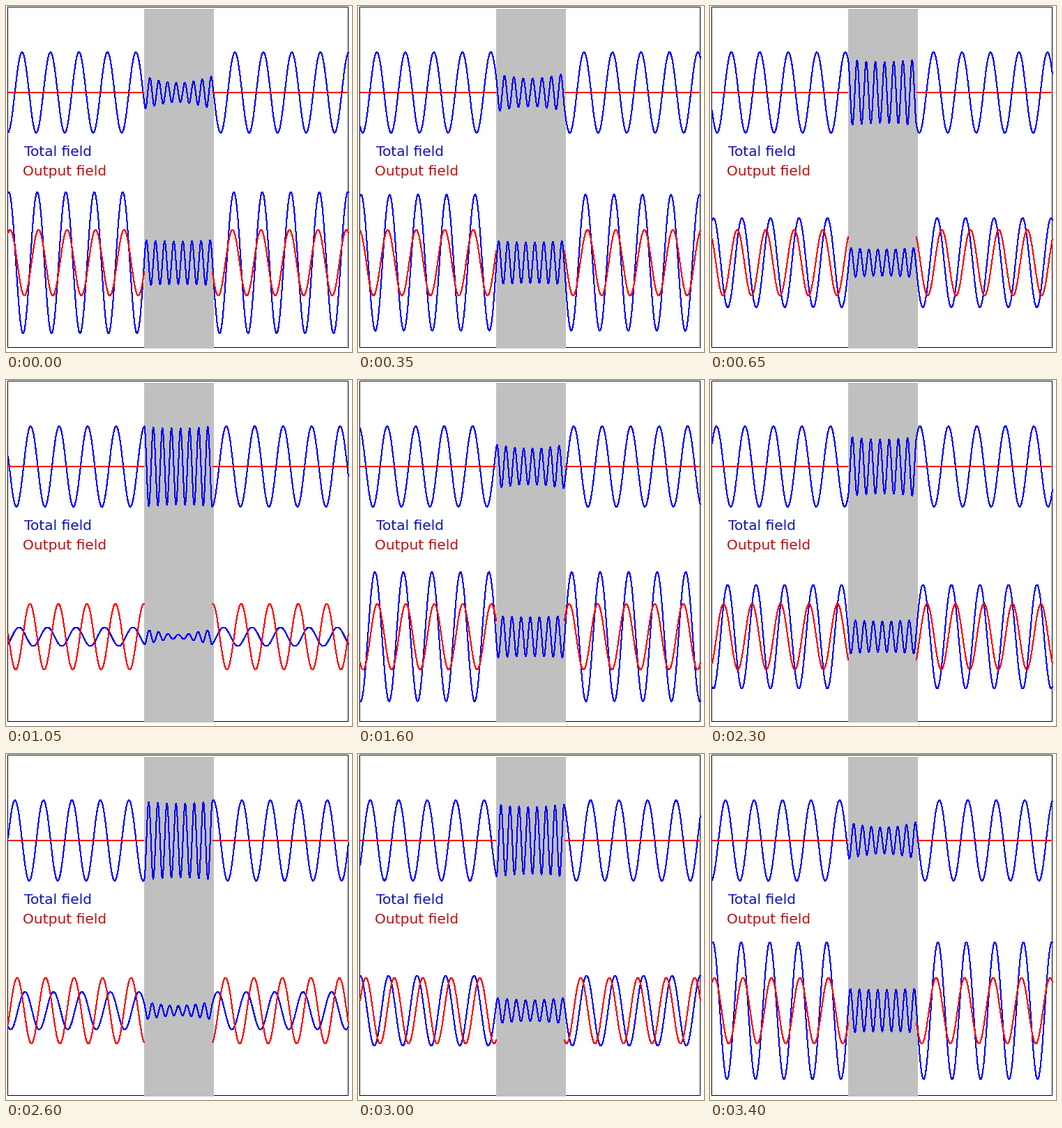
These frames come from a looping animation (496x496 px, 3.45 s). A matplotlib script:

```python
import numpy as np
import matplotlib.pyplot as plt
from matplotlib.animation import FuncAnimation
from matplotlib.patches import Rectangle

SIZE, DPI = 496, 100
FRAMES, INTERVAL = 69, 50
PX = 72 / DPI  # one pixel in points

LEFT, RIGHT = 2.5, 490.5
CENTER, HALF = 246.5, 48.8  # middle and half width of the absorbing slab
WAVELENGTH = 40.85
AMP, PHASE = 57.7, 1.83     # incoming wave at the slab's left face
TOP_Y, BOTTOM_Y = 123.5, 367.5
BLUE, RED = "#0000ff", "#ff0000"
K = 2 * np.pi / WAVELENGTH


def slab_phase():
    """Complex phase across half the slab for perfect absorption of the odd mode."""
    z = 7.5 * np.pi
    for _ in range(30):
        z = 7.5 * np.pi + np.arctan(1j * K * HALF / z)
    return z


Z = slab_phase()
N2 = (Z / (K * HALF)) ** 2
REFLECT = (1 - N2) / (1 + N2)

outside = np.linspace(LEFT - CENTER, -HALF, 600)
inside = np.linspace(-HALF, HALF, 800)
x_out = outside + CENTER
x_all = CENTER + np.concatenate([outside, inside, -outside[::-1]])

face = AMP * np.exp(1j * PHASE)
incoming = face * np.exp(1j * K * (outside + HALF))
outgoing = -REFLECT * face * np.exp(-1j * K * (outside + HALF))

# Odd input is fully absorbed, even input is partly sent back out.
odd_core = -face * np.sin(Z * inside / HALF) / np.sin(Z)
odd = np.concatenate([incoming, odd_core, -incoming[::-1]])
even_side = outgoing - incoming
even_core = -face * (1 + REFLECT) * np.cos(Z * inside / HALF) / np.cos(Z)
even = np.concatenate([even_side, even_core, even_side[::-1]])

fig = plt.figure(figsize=(SIZE / DPI, SIZE / DPI), dpi=DPI, facecolor="white")
ax = fig.add_axes([0, 0, 1, 1])
ax.set_xlim(-0.5, SIZE - 0.5)
ax.set_ylim(SIZE - 0.5, -0.5)
ax.axis("off")

ax.add_patch(Rectangle((2, 1), 488, 488, fill=False, edgecolor="black",
                       linewidth=PX, snap=False, zorder=1))
ax.add_patch(Rectangle((197.5, 3.5), 100, 487, facecolor="#c0c0c0",
                       linewidth=0, zorder=2))


def label(x, y, text, color):
    ax.text(x, y, text, color=color, family="DejaVu Sans", fontsize=20.2 * PX,
            ha="left", va="baseline", zorder=5)


label(25.8, 214, "Total \ufb01eld", "#1010c0")
label(23, 242, "Output \ufb01eld", "#c01010")


def curve(x, field, base, color, zorder):
    # Without antialiasing a one pixel stroke fills two pixels.
    line, = ax.plot(x, snapshot(field, 1, base), color=color, linewidth=PX,
                    antialiased=False, solid_capstyle="butt", zorder=zorder)
    return line


def snapshot(field, turn, base):
    return base - (field * turn).real


total_top = curve(x_all, odd, TOP_Y, BLUE, 3)
total_bottom = curve(x_all, even, BOTTOM_Y, BLUE, 3)
for ends in ([LEFT, CENTER - HALF], [CENTER + HALF, RIGHT]):
    ax.plot(ends, [TOP_Y, TOP_Y], color=RED, linewidth=2 * PX,
            solid_capstyle="butt", snap=False, zorder=4)
outputs = [curve(x, outgoing, BOTTOM_Y, RED, 4)
           for x in (x_out, 2 * CENTER - x_out)]


def update(frame):
    turn = np.exp(-2j * np.pi * frame / FRAMES)
    total_top.set_ydata(snapshot(odd, turn, TOP_Y))
    total_bottom.set_ydata(snapshot(even, turn, BOTTOM_Y))
    for line in outputs:
        line.set_ydata(snapshot(outgoing, turn, BOTTOM_Y))
    return [total_top, total_bottom, *outputs]


anim = FuncAnimation(fig, update, frames=FRAMES, interval=INTERVAL,
                     repeat=True, repeat_delay=0, blit=False)
plt.show()
```
